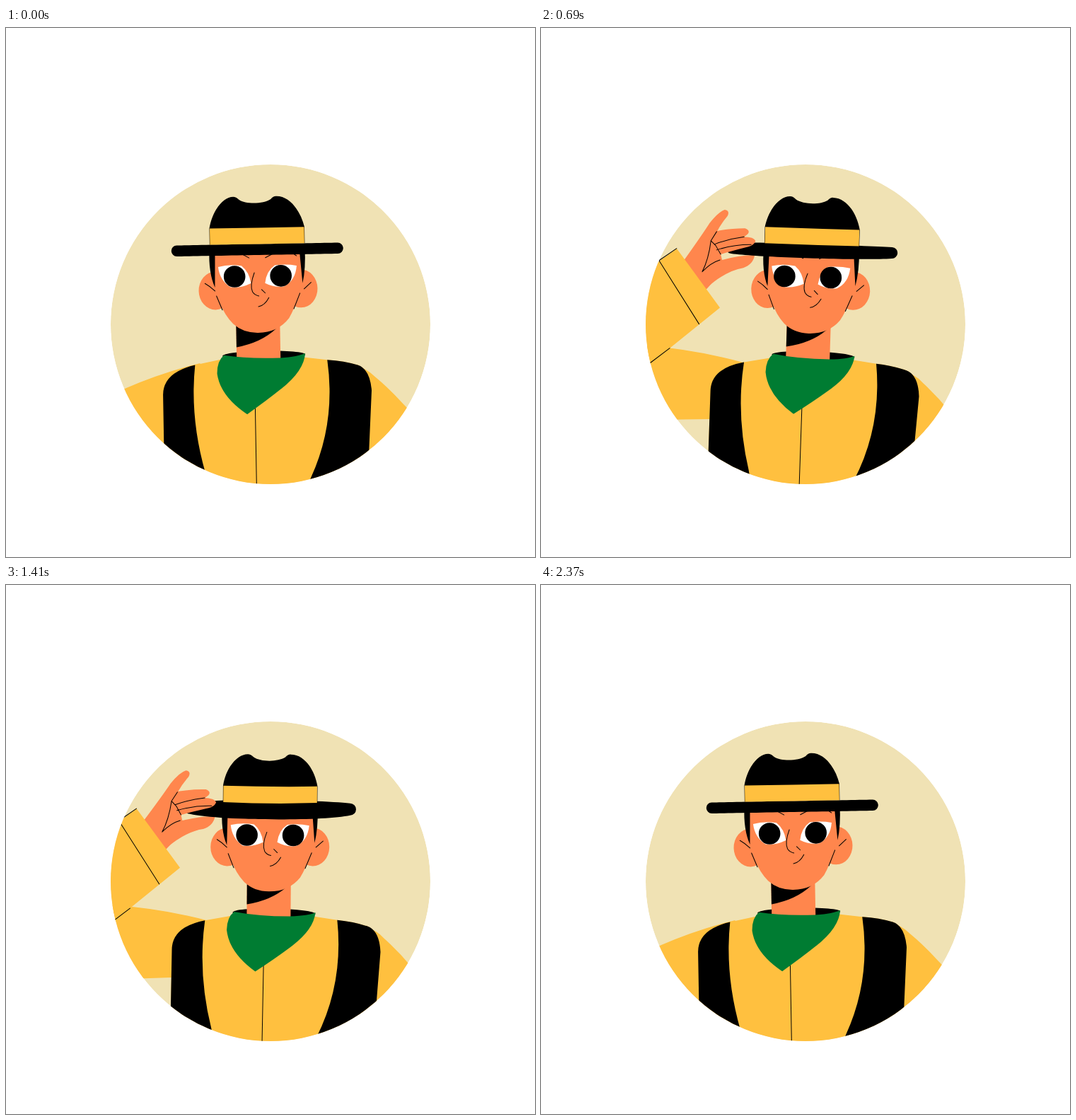
Animation of 748x748 px, one loop 2.4 s. Source, as an HTML page:

```html
<!DOCTYPE html>
<html lang="en">
<head>
<meta charset="utf-8">
<title>Hat tip</title>
<style>
html, body { margin: 0; width: 100%; height: 100%; overflow: hidden; background: #fff; }
svg { display: block; width: 100vw; height: 100vh; }
.y { fill: #ffc03f; }
.o { fill: #ff864d; }
.c { fill: #f0e2b4; }
.g { fill: #007c32; }
.w { fill: #fff; }
.ln { fill: none; stroke: #000; stroke-width: 1; stroke-linecap: round; stroke-linejoin: round; }
</style>
</head>
<body>
<svg viewBox="0 0 748 748">
  <defs>
    <clipPath id="disc"><circle cx="374" cy="419" r="226"/></clipPath>
  </defs>
  <g clip-path="url(#disc)">
    <circle class="c" cx="374" cy="419" r="226"/>
    <path id="upper" class="y"/>

    <g class="body">
      <path class="y" d="M495 479Q515 482 528 496Q549 514 567 535L600 570V680H495Z"/>
      <path class="y" d="M228 680V515Q230 485 274 475L315 467H430L461 471Q485 473 504 479Q523 487 523 515L514 680Z"/>
      <path d="M274 475Q265 550 286 628L296 680H228V517Q228 485 274 475Z"/>
      <path d="M461 471Q472 560 435 637L416 680H513L523 515Q521 485 504 479Q485 473 461 471Z"/>
      <path class="ln" d="M358 536V680"/>
      <ellipse cx="371.5" cy="463" rx="58.5" ry="6.5"/>
    </g>

    <g class="head">
      <rect class="o" x="333" y="395" width="62" height="78"/>
      <path id="shade" d="M333 405H392L389 426Q368 445 333 451Z"/>
    </g>

    <g class="body">
      <path class="g" d="M315 462Q350 468 395 467Q420 466 430 461Q428 486 395 511Q373 528 346.500 546Q309 520 305 488Q305 470 315 462Z"/>
    </g>

    <g class="head">
      <g id="ears">
        <ellipse class="o" cx="304.500" cy="370.500" rx="23.500" ry="27"/>
        <ellipse class="o" cx="425.500" cy="369.500" rx="23.500" ry="27"/>
        <path class="ln" d="M290 360Q297 364 304 371M440 361L430 370"/>
      </g>
      <g id="face">
        <path class="o" d="M301 312L303 345Q305 393 329 418Q343 431 364 431Q392 431 408 411Q424 385 428 345V312Z"/>
        <path d="M296 312H305L304 366Q295 345 297 312ZM424 312H432Q433 342 428 362Z"/>
        <path class="ln" d="M306 378L314 398M424 376L415 398"/>
      </g>
      <g id="eyes">
        <path class="w" d="M309 337Q325 333 342 336Q353 345 355 361Q340 368 326 366Q311 356 309 337ZM375 361Q377 344 389 336Q405 334 420 337Q418 358 402 366Q388 368 375 361Z"/>
        <g id="pupils">
          <circle cx="332" cy="351" r="15.300"/>
          <circle cx="397.500" cy="351" r="15.300"/>
        </g>
        <path class="ln" d="M344 320L353 325M386 320L376 325M302 322L308 319M414 319L420 323"/>
      </g>
      <path id="nose" class="ln" d="M360 346Q353 364 357 373Q360 378 366 379M370 370L375 375M365 394Q374 392.500 380 381.500"/>
    </g>

    <g class="arm">
      <path class="hand o" d="M234 366Q262 341 286 337Q300 332 302 319Q285 318 256 326L244 316L225 340Z"/>
    </g>

    <g class="head">
      <path id="brim"/>
      <path id="crown"/>
      <path id="band" class="y"/>
    </g>

    <g class="arm">
      <g class="hand">
        <path class="o" d="M200 330Q226 293 238 274Q250 258 259 255Q267 256 263 264Q254 275 249 285Q270 281 288 281Q296 284 292 289Q289 292 286 293Q301 293 303 299Q301 305 293 307Q270 313 254 318L256 326L250 350L232 370Z"/>
        <path class="ln" d="M248 286L240 299Q237 325 228 343Q240 330 253 326M240 299L247 306L254 318M245 304Q265 296 287 293M248 312Q272 304 297 304"/>
      </g>
      <path class="y" d="M192 310L253 394L182 451L141 484L79 392Z"/>
      <path class="ln" d="M192 310L167 327L223.500 417M182 451L154 472"/>
    </g>
  </g>
</svg>
<script>
const LOOP = 2400;

const $ = id => document.getElementById(id);
const all = (cls, value) =>
  document.querySelectorAll('.' + cls).forEach(el => el.setAttribute('transform', value));
const move = (id, x, y) => $(id).setAttribute('transform', `translate(${x} ${y})`);
const draw = (id, d) => $(id).setAttribute('d', d);

// Cubic ease in and out, from 0 at time a to 1 at time b
function ramp(t, a, b) {
  const u = Math.min(1, Math.max(0, (t - a) / (b - a)));
  return u < .5 ? 4 * u ** 3 : 1 - 4 * (1 - u) ** 3;
}

// Eases up between a and b, then back down between c and d
const swell = (t, a, b, c, d) => ramp(t, a, b) - ramp(t, c, d);

function drawHat(bow) {
  const bulge = bow ** .6;
  const y = 313.3 + 12 * bow, r = 7.8 + 3 * bow;
  const top = y - r, low = y + r;
  const l = 243.2 + r, rt = 486.3 - r, in1 = 295 - 20 * bow, in2 = 434 + 20 * bow;
  const up = top - 20 * bow, down = low + 21 * bulge;
  draw('brim', `M${l} ${top}C${in1} ${up} ${in2} ${up} ${rt} ${top}A${r} ${r} 0 0 1 ${rt} ${low}` +
    `C${in2} ${down} ${in1} ${down} ${l} ${low}A${r} ${r} 0 0 1 ${l} ${top}Z`);

  const base = 282.5 + 7 * bow, hem = 305.5 + 8 * bow;
  const x1 = 297.5 + 2 * bow, x2 = 432 - 2 * bow;
  const tip = 238.3 + 4 * bow, dx = 3 * bow;
  draw('crown', `M${x1} ${hem}V${base}C302 258 ${317 + dx} ${tip} ${332 + dx} ${tip}` +
    `Q${336 + dx} ${tip} ${340 + dx} ${tip + 4}C${350 + dx} ${tip + 11} ${374 + dx} ${tip + 11} ${385 + dx} ${tip + 4}` +
    `Q${389 + dx} ${tip - .5} ${393 + dx} ${tip}C${412 + dx} ${tip} 427 260 ${x2} ${base}V${hem}Z`);
  draw('band', `M${x1 + .5} ${base}Q365 ${base + 6 * bow} ${x2 - .5} ${base}` +
    `V${hem}Q365 ${hem + 11 * bow} ${x1 + .5} ${hem}Z`);
}

function drawArm(rest, dip, bow, sway) {
  const x = 253 - 150 * rest - 16 * dip;
  const y = 394 - 179 * rest + 226 * rest ** 2 + 24 * bow;
  all('arm', `translate(${x} ${y}) rotate(${-58 * rest - 1.6 * bow}) translate(-253 -394)`);
  all('hand', `rotate(${24 * rest + 9 * bow} 218 345)`);

  const lift = 448 + 62 * rest + 8 * rest ** 2 + 20 * bow;
  const drop = Math.max(0, lift - 487);
  const outer = lift + 105 + 3.27 * drop;
  const inner = 552 + .35 * (lift - 447) + 4.5 * drop + 3 * bow;
  const sx = 280 + 5.5 * sway, sy = 474 + 3 * bow;
  draw('upper', `M${sx} ${sy}Q${(sx + 150) / 2} ${(sy + lift) / 2 - 7} 150 ${lift}` +
    `L100 ${lift + 12}V${outer + 8}L150 ${outer}L240 ${inner}L${sx} ${inner}Z`);
}

function render(t) {
  const bow = swell(t, 620, 900, 1130, 1590);
  const dip = swell(t, 680, 950, 1150, 1650);
  const rest = 1 - swell(t, 0, 600, 1590, 2130);
  const sway = 2.95 * swell(t, 0, 600, 1640, 2200) - 1.95 * dip - 1;
  const gaze = -4.5 * swell(t, 300, 600, 680, 900);
  const lean = y => `translate(${3.7 * sway} ${y}) rotate(${sway} 358 644)`;

  all('body', lean(3 * bow));
  all('head', `${lean(0)} rotate(${-2.6 * bow} 364 470)`);
  move('ears', 0, bow);
  move('face', 0, 9 * bow);
  move('eyes', bow, 11 * bow);
  move('pupils', gaze, 0);
  move('nose', 2 * bow, 14 * bow);
  move('shade', 0, 3 * bow);
  drawHat(bow);
  drawArm(rest, dip, bow, sway);
}

const start = performance.now();
function tick() {
  render((performance.now() - start) % LOOP);
  requestAnimationFrame(tick);
}
render(0);
requestAnimationFrame(tick);
</script>
</body>
</html>
```
